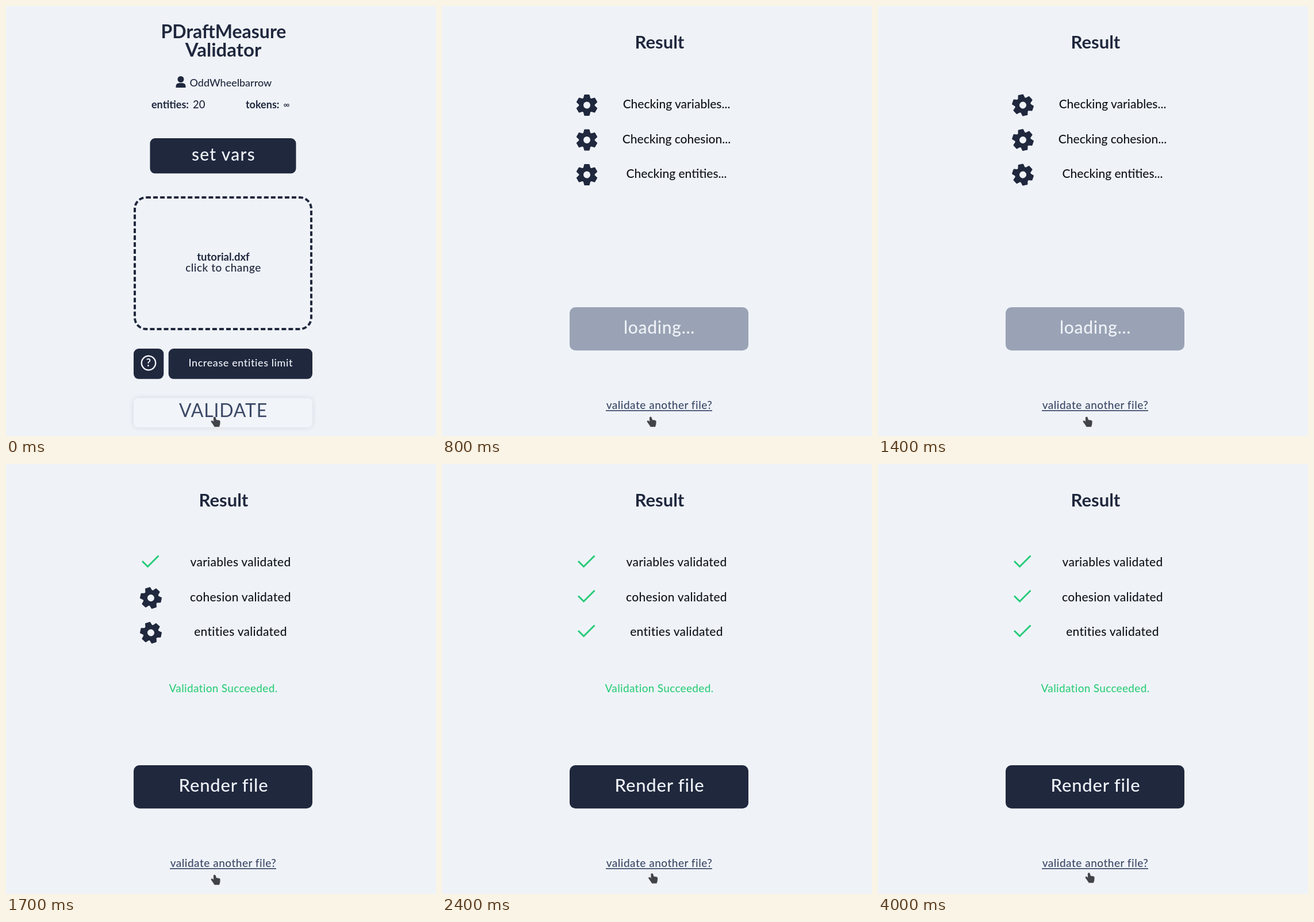
An HTML page that plays this animation: 748x748 px, repeating every 4.1 s.

```html
<!DOCTYPE html>
<html lang="en">
<head>
<meta charset="utf-8">
<title>Validator</title>
<style>
  html, body { margin: 0; width: 100%; height: 100%; overflow: hidden; background: #eff3f8; }
  svg { position: absolute; left: 0; top: 0; font-family: Lato, sans-serif; }
  .box { position: absolute; box-sizing: border-box; left: 222px; width: 311px; }
  #drop { top: 331px; height: 232.5px; border: 4px dashed #20283e; border-radius: 22px; }
  #validate { top: 682px; height: 51px; border-radius: 8px; background: #f1f4f9; box-shadow: 0 0 10px rgba(32, 40, 62, .12); }
</style>
</head>
<body>
<div id="form">
  <div id="drop" class="box"></div>
  <div id="validate" class="box"></div>
</div>
<svg id="stage" width="748" height="748" viewBox="0 0 748 748"></svg>
<script>
const LOOP = 4100, STEP = 100, RESULT_AT = 800, DONE_AT = 1600, CHECK_GAP = 400;
const NAVY = '#20283e', PALE = '#eff3f8', SLATE = '#3b4866', GREEN = '#26cb77', GREY = '#9aa3b5';
const stage = document.getElementById('stage');
const form = document.getElementById('form');

function add(parent, tag, attrs, content = '') {
  const node = document.createElementNS('http://www.w3.org/2000/svg', tag);
  for (const [key, value] of Object.entries(attrs)) node.setAttribute(key, value);
  node.textContent = content;
  parent.append(node);
  return node;
}
const group = (parent, attrs = {}) => add(parent, 'g', attrs);
const rect = (parent, x, y, width, height, fill = NAVY, rx = 9) =>
  add(parent, 'rect', { x, y, width, height, rx, fill });
const text = (parent, content, x, y, size, fill, spacing = 0, weight = 500, anchor = 'middle') =>
  add(parent, 'text', { x, y, fill, 'font-size': size, 'letter-spacing': spacing,
    'font-weight': weight, 'text-anchor': anchor }, content);
const show = (node, visible) => { node.style.display = visible ? '' : 'none'; };

// Form screen
const formArt = group(stage);
text(formArt, 'PDraftMeasure', 378.5, 56, 32, NAVY, 0, 700);
text(formArt, 'Validator', 378, 88, 33, NAVY, 0, 700);
add(formArt, 'circle', { cx: 304, cy: 127.5, r: 5.5, fill: NAVY });
add(formArt, 'path', { d: 'M295.5 142v-2q0-6 6-6h5q6 0 6 6v2z', fill: NAVY });
text(formArt, 'OddWheelbarrow', 319.5, 140, 18, NAVY, 0, 500, 'start');
text(formArt, 'entities:', 253, 178, 18, NAVY, 0, 700, 'start');
text(formArt, '20', 325, 178, 18.5, NAVY, 0, 500, 'start');
text(formArt, 'tokens:', 417, 178, 18, NAVY, 0, 700, 'start');
text(formArt, '∞', 488, 177, 15, NAVY);
rect(formArt, 250.5, 230, 254, 61.3);
text(formArt, 'set vars', 378.5, 269, 30, PALE, 1.3);
text(formArt, 'tutorial.dxf', 378, 443, 18.5, NAVY, 0, 700);
text(formArt, 'click to change', 378, 462, 19, NAVY, .5);
rect(formArt, 222, 596, 52.3, 52.8);
add(formArt, 'circle', { cx: 248, cy: 621, r: 12.2, fill: 'none', stroke: PALE, 'stroke-width': 2.4 });
text(formArt, '?', 248, 627.3, 18, PALE, 0, 700);
rect(formArt, 282.7, 596, 250.3, 52.8);
text(formArt, 'Increase entities limit', 408.3, 627, 18, PALE, .6);
text(formArt, 'VALIDATE', 378, 715, 32, SLATE, .8, 400);

// Result screen
const result = group(stage), pending = group(result), done = group(result);
text(result, 'Result', 378.5, 74, 31, NAVY, 0, 700);

const gearPoints = [];
for (let tooth = 0; tooth < 360; tooth += 60) {
  for (const [offset, radius] of [[-24, 12.8], [-12, 18], [12, 18], [24, 12.8]]) {
    const angle = (tooth + offset) * Math.PI / 180;
    gearPoints.push(`${radius * Math.sin(angle)},${-radius * Math.cos(angle)}`);
  }
}
const rows = ['variables', 'cohesion', 'entities'].map((name, i) => {
  const y = 172.5 + 60.5 * i;
  text(pending, `Checking ${name}...`, 408, y + 5.5, 21, '#12151c');
  text(done, `${name} validated`, 408, y + 5.5, 21, '#12151c', .25);
  const icon = group(result, { transform: `translate(252 ${y})` });
  const gear = group(icon);
  add(gear, 'polygon', { points: gearPoints.join(' '), fill: NAVY, stroke: NAVY,
    'stroke-width': 2, 'stroke-linejoin': 'round' });
  add(gear, 'circle', { r: 6, fill: PALE });
  const check = add(icon, 'path', { d: 'M-15-3.5l9.5 9.5L13.5-13', fill: 'none', stroke: GREEN, 'stroke-width': 3 });
  return { gear, check, checkedAt: DONE_AT + i * CHECK_GAP };
});

rect(pending, 222, 524, 311, 75.3, GREY, 10);
text(pending, 'loading...', 378, 570, 30, PALE, .7);
text(done, 'Validation Succeeded.', 378, 397, 19, '#30ce7b', .3);
rect(done, 222, 524, 311, 75.3, NAVY, 10);
text(done, 'Render file', 378.5, 570, 31, PALE, .8);
text(result, 'validate another file?', 378, 701, 19, SLATE, .5);
rect(result, 285, 703, 185, 1.7, SLATE, 0);

const cursor = add(stage, 'path', {
  d: 'M361 716.5c0-2 3-2.5 3.6-.6l1.2 4 4.8.8c1.6.4 2 1.4 1.9 3l-.4 4.6-1.3 3.7h-8l-2.6-4-3.2-4.6c-.8-1.6.8-2.8 2.2-1.8l2 1.6z',
  fill: '#414348', stroke: '#d5d8dd', 'stroke-width': 1.6, 'paint-order': 'stroke'
});
// Start time and offset of each pointer position
const cursorStops = [[0, 0, 0], [2400, 2.5, -2.5], [3300, 1.5, -1.5], [3400, 0, -1], [4000, 4, -3.5]];

function render(now) {
  const time = Math.floor(now % LOOP / STEP) * STEP;
  const onForm = time < RESULT_AT;
  show(form, onForm);
  show(formArt, onForm);
  show(result, !onForm);
  show(pending, time < DONE_AT);
  show(done, time >= DONE_AT);
  for (const { gear, check, checkedAt } of rows) {
    show(gear, time < checkedAt);
    show(check, time >= checkedAt);
    gear.setAttribute('transform', `rotate(${(time - RESULT_AT) * .18})`);
  }
  const [, dx, dy] = cursorStops.findLast(([start]) => time >= start);
  cursor.setAttribute('transform', `translate(${dx} ${dy})`);
}

const startTime = performance.now();
function tick() {
  render(performance.now() - startTime);
  requestAnimationFrame(tick);
}
tick();
</script>
</body>
</html>
```
